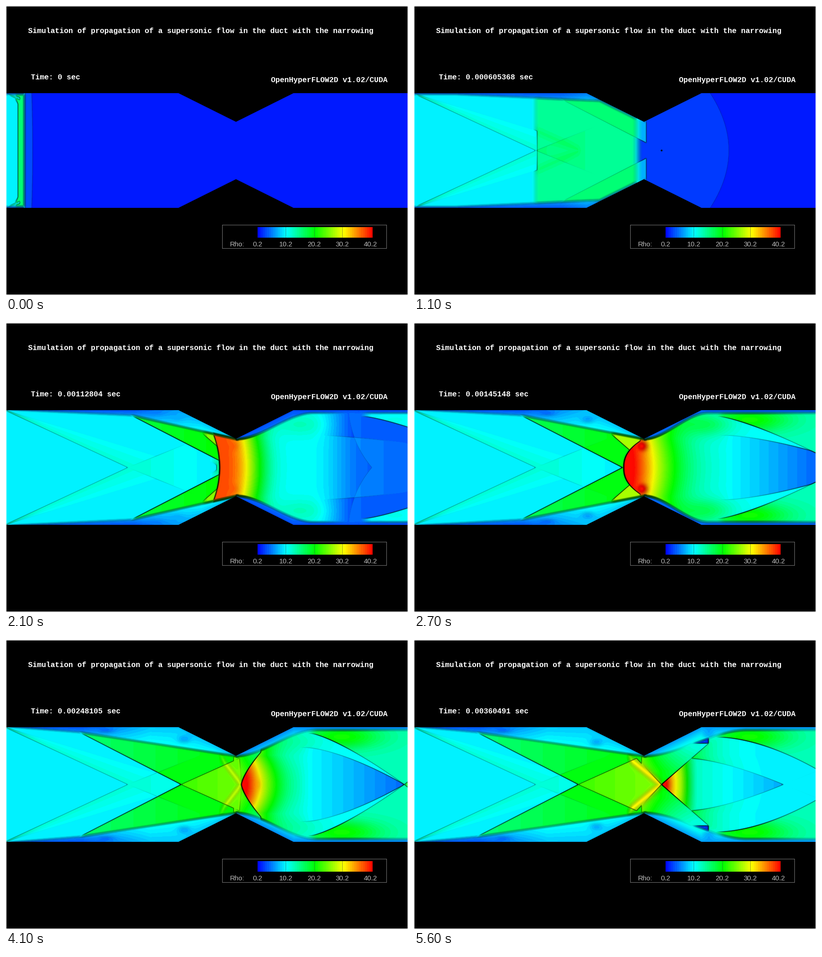
A matplotlib script that plays this animation: 874x630 px, repeating every 5.7 s.

```python
import numpy as np
import matplotlib.pyplot as plt
from matplotlib.animation import FuncAnimation
from matplotlib.patches import Rectangle

W, H, FRAMES, BANDS = 874, 630, 57, 61
AXIS = 315
X = np.arange(1, 873) + 0.5
Y = (np.arange(190, AXIS) + 0.5)[:, None]
WALL = np.interp(X, [375, 500, 625], [190, 252.5, 190])
INSIDE = np.clip(Y - WALL + 0.5, 0, 1)
OFF_AXIS = np.minimum(((AXIS - Y) / 63) ** 2, 1)


def key(n, points):
    return float(np.interp(n, list(points), list(points.values())))


def edge(d, s=2):
    t = np.clip(d / s + 0.5, 0, 1)
    return t * t * (3 - 2 * t)


def ray(x, y, slope):
    return y + slope * (X - x)


def curve(x0, y0, x1, power):
    """Curve from (x0, y0) that meets the axis at x1."""
    return y0 + (AXIS - y0) * np.clip((X - x0) / (x1 - x0), 0, 1.5) ** power


def fill(f, top, bot, v, x0=-50, x1=950, soft=2, ends=(2, 2), a=1):
    """Blend density v into the area between two curves."""
    if a <= 0:
        return

    def lean(c):
        return soft * np.minimum(np.hypot(1, np.gradient(c + 0 * X)), 8)

    m = edge(Y - top, lean(top)) * edge(bot - Y, lean(bot))
    m = m * edge(X - x0, ends[0]) * edge(x1 - X, ends[1]) * a
    f += m * (v - f)


def blob(f, x, y, rx, ry, amp):
    if amp:
        f += amp * np.exp(-((X - x) / rx) ** 2 - ((Y - y) / ry) ** 2)


def disc(f, x, y, rx, ry, v, a):
    if a > 0 and rx > 1:
        r = np.hypot((X - x) / rx, (Y - y) / ry)
        f += edge((1 - r) * rx) * a * (v - f)


def ridge(f, x0, y0, x1, y1, width, amp):
    """Soft streak along a straight line."""
    if amp:
        y = ray(x0, y0, (y1 - y0) / (x1 - x0))
        ends = edge(X - x0, 14) * edge(x1 - X, 14)
        f += amp * ends * np.exp(-((Y - y) / width) ** 2)


def separation(n):
    """Point where the flow leaves the wall; it creeps upstream."""
    return 140 + 180 * np.clip(1 - (n - 15) / 35, 0, 1) ** 1.5


def slug_end(n):
    return min(40 + 40.5 * n, 520)


def inlet(f, n):
    """Incoming stream, the dense slug it pushes and the leading-edge shock."""
    xl = key(n, {0: 26, 6: 173, 15: 343, 21: 458, 22: 480})
    xr = slug_end(n)
    corner = key(n, {0: 203, 6: 272, 15: 262, 21: 300})
    f += edge(min(xl + 30, xr - 10) - X, 4) * (10 - f)

    above = edge(corner + 6 - Y, 12)
    spread = 2 + above * key(n, {0: 4, 6: 5, 15: 25})
    slug = edge(X - xl + 4 * above, spread)
    slug = slug * edge(xr - X, key(n, {0: 8, 6: 24}))
    f += slug * key(n, {21: 1, 23: 0}) * (key(n, {0: 16, 3: 14.4}) - f)

    shock = ray(0, 191, 0.468)
    depth = 1 + 0.16 * X
    v = 10.3 + (1.7 + 3 * np.exp(-X / 40)) * (1 - (shock - Y) / depth)
    fill(f, shock - depth, np.minimum(shock, ray(265, AXIS, -0.405)), v,
         x1=max(xl, 30) if n < 12 else 430, soft=1.8)
    ridge(f, xl, corner + 6, xl + 95, AXIS, 11,
          key(n, {0: 0, 4: 2.5, 9: 2.5, 13: 0}))


def throat(f, n):
    sep = separation(n)
    hit = sep + 217
    end = hit + 127
    tip = key(n, {12: 510, 15: 473, 27: 456, 35: 480, 46: 538})

    # separation shock and the reflected leading wave
    v = key(n, {15: 19, 27: 17, 46: 15.6}) + 3 * (X - sep) / 217
    fill(f, 180, ray(sep, 203, 0.515), v, x0=sep - 2, x1=505, ends=(26, 2),
         a=key(n, {10: 0, 14: 1}))
    fill(f, ray(265, AXIS, -0.405), 330,
         f + 2.2 * np.clip((430 - X) / 165, 0, 1), soft=1.8,
         a=key(n, {8: 0, 13: 1}))
    fill(f, 180, ray(432, 245, 0.87), key(n, {27: 27, 35: 24}), x0=432,
         ends=(15, 2), a=key(n, {17: 0, 22: 1, 35: 1, 40: 0}))

    # expansion past the throat and the diamond in front of it
    v = 14 + 13 * np.exp(-(X - 495) / 60)
    fill(f, 225, 330, v - 4 * np.clip((285 - Y) / 50, 0, 1), x0=495, x1=660,
         a=key(n, {35: 0, 38: 1}))
    down = ray(end, 258, 57 / max(tip - end, 5))
    fill(f, np.maximum(ray(hit, AXIS, -0.45), down), 330,
         23 + 0.015 * (X - hit), x0=hit, x1=max(tip, hit + 2))
    ridge(f, 468, 258, tip, AXIS, 10, key(n, {38: 0, 46: 9, 56: 6}))

    # bow shock with the hot gas behind it
    xt = key(n, {12: 430, 15: 405, 27: 492, 35: 494, 46: 604, 56: 640})
    yt = key(n, {15: 214, 27: 257, 35: 260, 46: 232, 56: 226})
    power = key(n, {15: 1.6, 27: 2.4, 35: 2, 46: 0.9, 56: 1})
    bow = tip + (xt - tip) * np.clip((AXIS - Y) / (AXIS - yt), 0, 1) ** power
    bend = key(n, {15: 4, 27: 10, 35: 22, 46: 22, 56: 15})
    reach = key(n, {12: 40, 15: 74, 27: 101, 35: 85, 46: 55, 56: 64})
    fall = key(n, {15: 4, 27: 1.7, 46: 1.45, 56: 1.1})
    peak = key(n, {12: 22, 15: 33, 27: 43})
    low = 2.3 + key(n, {46: 8.2, 56: 7.2}) * edge(480 + 40 * (n - 15) - X, 120)
    d = np.maximum(X + bend * OFF_AXIS - tip, 0)
    wake = low + (peak - low) * np.exp(-(d / reach) ** fall)
    f += edge(X - bow, 3) * key(n, {11: 0, 13: 1}) * (wake - f)

    hot = key(n, {12: 0, 15: 1, 21: 0})
    blob(f, 455, 240, 22, 13, 4 * hot)
    blob(f, 491, 284, 15, 18, 5 * hot)
    blob(f, 497, 268, 10, 10, key(n, {20: 0, 27: 7, 35: 4, 40: 0}))
    blob(f, 549, AXIS, 7, 14, key(n, {40: 0, 46: 6, 56: 2}))
    blob(f, 640, 221, 55, 25, key(n, {15: 0, 27: 5, 35: 4, 46: 0}))


def outlet(f, n):
    """Cold core and the shocks that close it."""
    grow = key(n, {19: 0, 24: 1})
    x0 = key(n, {27: 680, 35: 650, 46: 655, 56: 600})
    x1 = key(n, {20: 1200, 27: 980, 35: 866, 46: 866, 56: 803})
    y0 = key(n, {27: 245, 35: 241, 46: 229, 56: 258})
    v0, v1 = key(n, {46: 10.5, 56: 13}), key(n, {27: 4, 46: 5, 56: 7})
    v = v0 + (v1 - v0) * np.clip((X - x0) / 200, 0, 1)
    fill(f, curve(x0, y0, x1, 1.5), 330, v, x0=x0, ends=(40, 2), a=grow)
    fill(f, ray(x1, AXIS, -0.4), 330, 10, x0=x1, a=grow)

    x0 = key(n, {20: 800, 27: 665})
    x1 = key(n, {20: 1120, 27: 935, 35: 866, 46: 866, 56: 930})
    shock = curve(x0, key(n, {46: 204, 56: 212}), x1,
                  key(n, {46: 1.3, 56: 1.7}))
    glow = np.exp(-((X - x0 - 65) / 85) ** 2 - ((Y - 211) / 26) ** 2)
    fill(f, 180, shock, 13.2 + 8 * glow, x0=x0, ends=(28, 2), a=grow)
    fill(f, ray(x1, AXIS, -0.8), 330, 18, x0=x1, a=grow)


def walls(f, n):
    """Slow gas along the walls, with a few swirls."""
    sep, end = separation(n), min(slug_end(n), 505)
    thin = np.maximum(189 + 0.045 * X, WALL + 3)
    thick = np.interp(X, [0, sep, 505], [189, 202, 254])
    y = thin + (thick - thin) * key(n, {11: 0, 16: 1})
    v = 3.5 + 4.5 * np.clip((X - sep) / 150, 0, 1)
    fill(f, 180, y, v + 3 * np.clip((Y - WALL) / (y - WALL + 1), 0, 1),
         x1=end, soft=8, ends=(2, 6))

    width = key(n, {15: 200, 27: 140, 35: 160, 46: 190, 56: 225})
    y = 196 + 57 * (1 - edge(X - 500 - width / 2, width))
    v = key(n, {15: 2.5, 27: 4, 46: 6.5})
    v = v + key(n, {15: 0.5, 27: 5}) * np.clip((Y - WALL) / 25, 0, 1)
    fill(f, 180, y, v, x0=500, soft=8, a=key(n, {9: 0, 13: 1}))

    swirl = key(n, {18: 0, 27: 1})
    blob(f, 378 + 0.62 * (n - 27), 210 + 0.45 * (n - 27), 15, 8, -2.5 * swirl)
    blob(f, sep + 55, 197, 18, 5, -1.5 * swirl)
    blob(f, 641, 207, 13, 11, -2.5 * key(n, {48: 0, 56: 1}))


def density(n):
    f = np.full((len(Y), len(X)), key(n, {6: 3, 12: 2.5}))
    inlet(f, n)
    throat(f, n)
    disc(f, 400 + 25 * (n - 6), 190, 27 * (n - 5), 27 * (n - 5), 5,
         key(n, {6: 1, 8: 0.8, 10: 0}))
    disc(f, 757 + 38 * (n - 15), 180, 24 * (n - 11), 22 * (n - 11), 4.8,
         key(n, {20: 1, 24: 0}))
    outlet(f, n)
    walls(f, n)
    front = key(n, {0: 58, 6: 422, 12: 737, 15: 866, 17: 950})
    lag = key(n, {0: 2, 6: 0, 7.5: 0, 10: 45, 15: 22})
    front = front - lag * ((AXIS - Y) / 125) ** 2
    return 1.1 + (f - 1.1) * edge(front - X, 2.5)


def rainbow(u):
    u = 4 * np.asarray(u)
    return np.clip(np.stack([u - 2, np.minimum(u, 4 - u), 2 - u], -1), 0, 1)


def picture(n):
    f = density(n)
    band = np.clip(np.floor((f - 0.2) * 1.5), 0, BANDS - 1)
    gy, gx = np.gradient(f)
    shade = np.exp(-0.3 * np.maximum(np.hypot(gx, gy) - 0.15, 0))
    half = rainbow((band + 0.5) / BANDS) * (shade * INSIDE)[..., None]
    return np.concatenate([half, half[::-1]])


def clock(n):
    t = key(n, {0: 0, 6: 0.000356328, 15: 0.0008046, 27: 0.00145148,
                35: 0.00202923, 46: 0.00285757, 56: 0.00360491})
    return f"Time: {t:.6g} sec"


fig = plt.figure(figsize=(W / 100, H / 100), dpi=100, facecolor="white")
ax = fig.add_axes([0, 0, 1, 1])
ax.axis("off")


def box(x, y, w, h, color):
    ax.add_patch(Rectangle((x, y), w, h, fc=color, lw=0))


def show(img, extent):
    return ax.imshow(img, extent=extent, interpolation="nearest",
                     aspect="auto", zorder=2)


def mono(x, y, s):
    return ax.text(x, y, s, family="Liberation Mono", weight="bold",
                   size=16.27 * 0.72, color="white", zorder=4)


def label(x, s, ha="center"):
    ax.text(x, 524, s, family="Liberation Sans", size=15 * 0.72,
            color="#b8b8b8", ha=ha, zorder=4)


box(1, 1, W - 2, H - 2, "black")
duct = show(picture(0), (1, 873, 440, 190))
mono(48.5, 59, "Simulation of propagation of a supersonic flow "
               "in the duct with the narrowing")
mono(575.5, 166, "OpenHyperFLOW2D v1.02/CUDA")
timer = mono(53.8, 160.5, clock(0))

box(470, 477, 358, 52, "#787878")
box(471, 478, 356, 50, "black")
show(rainbow((np.arange(BANDS) + 0.5) / BANDS)[None], (547, 797, 505, 482))
label(487, "Rho:", "left")
for i in range(5):
    tick = 547 + 61.4 * i
    label(tick, f"{10 * i + 0.2:.1f}")
    if 0 < i < 4:
        ax.plot([tick, tick], [482, 505], color="#404040", alpha=0.5,
                lw=0.72, zorder=3)
ax.set_xlim(0, W)
ax.set_ylim(H, 0)


def draw(n):
    duct.set_data(picture(n))
    timer.set_text(clock(n))
    return duct, timer


ani = FuncAnimation(fig, draw, frames=FRAMES, interval=100, repeat=True,
                    repeat_delay=0)
plt.show()
```
